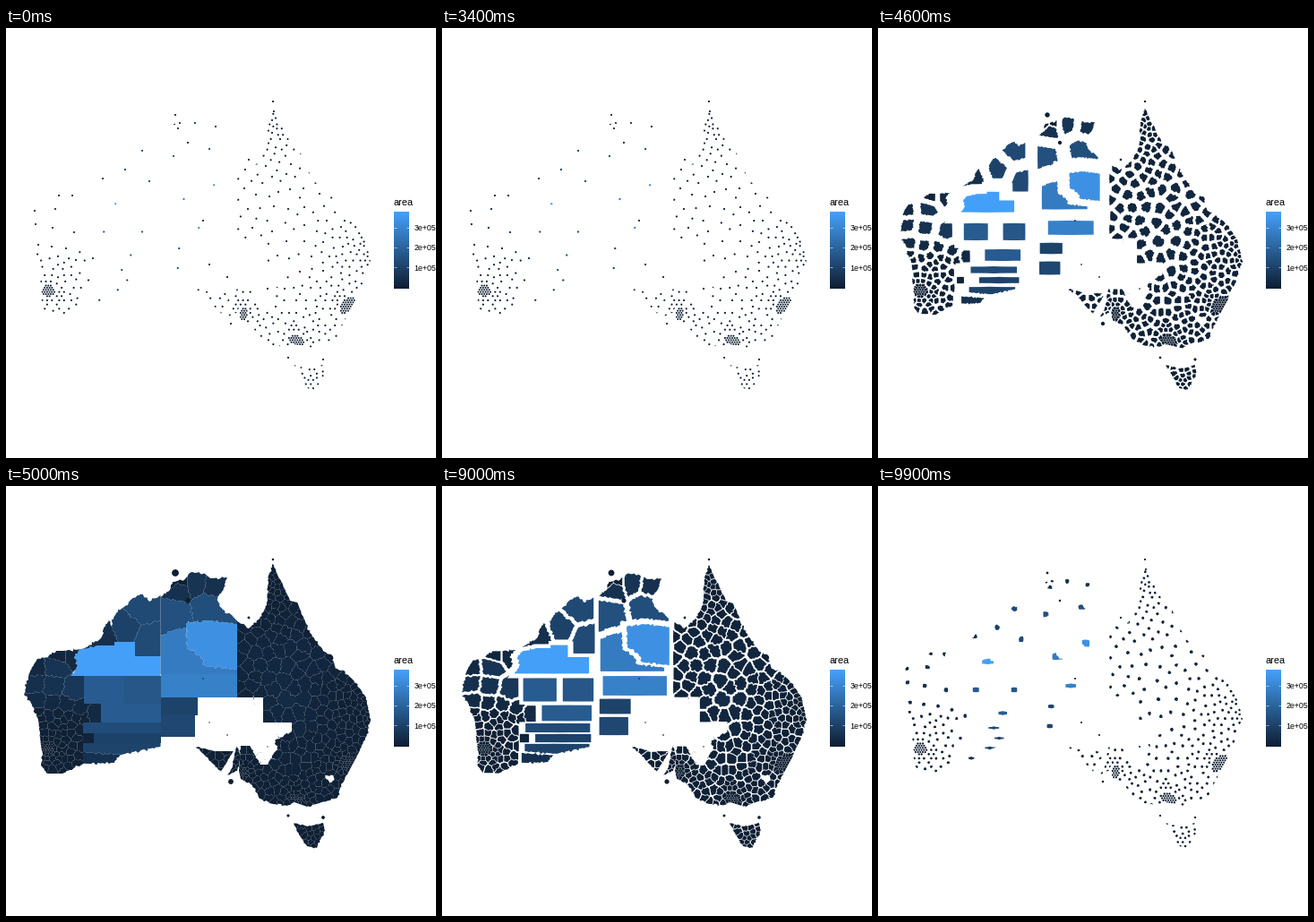
Recreate the animation shown at these times as a matplotlib script. Size 480 by 480 pixels, loop 10000 ms.

```python
import numpy as np
import matplotlib.pyplot as plt
from matplotlib.animation import FuncAnimation
from matplotlib.collections import PolyCollection
from matplotlib.colors import LinearSegmentedColormap
from matplotlib.path import Path

SIZE, FRAMES, INTERVAL = 480, 100, 100
HOLD, MOVE = 33, 17
DOT = 1.1
PITCH = 2.7
ROW = PITCH * np.sqrt(3) / 2
MAX_AREA = 2950
rng = np.random.default_rng(12)
cmap = LinearSegmentedColormap.from_list("area", ["#0e1e32", "#45a1fa"])

# Outback regions: straight boxes (left, top, right, bottom) and outlines.
WB, EB = 172.5, 258  # straight state borders
BOXES = [
    (87, 212, 131.5, 243), (131.5, 212, WB, 243), (106, 243, WB, 264),
    (86, 264, WB, 276), (98, 276, WB, 287), (86, 276, 98, 287),
    (WB, 210, EB, 236), (WB, 236, 214, 256), (WB, 256, 211, 280)]
PILBARA = [(72, 212), (80, 200), (76, 191), (84, 182), (102, 178), (121, 178),
           (121, 174), (144, 174), (144, 190), (WB, 190), (WB, 212)]
TABLELAND = [(201, 153), (224, 150), (EB, 154), (EB, 205), (222, 201), (217, 190), (202, 181)]
CENTRE = [(WB, 167), (187, 161), (201, 158), (202, 181), (217, 190), (222, 201),
          (EB, 205), (EB, 210), (WB, 210)]
PLAIN = [(86, 287), (WB, 287), (WB, 291), (128, 300), (86, 297)]
SOUTH_COAST = [(86, 297), (128, 300), (121, 309), (86, 310)]

# Coastal zones, split into cells around their seeds.
WEST = [
    (84, 182), (64, 184), (56, 184), (47, 191), (35, 193), (26, 209), (20, 233),
    (27, 240), (36, 261), (39, 290), (41, 299), (39, 311), (46, 321), (63, 321),
    (86, 310), (86, 264), (106, 264), (106, 243), (87, 243), (87, 212), (72, 212),
    (80, 200), (76, 191)]
KIMBERLEY = [
    (86, 182), (106, 170), (109, 159), (115, 150), (118, 157), (121, 145), (130, 136),
    (147, 122), (153, 121), (160, 129), (WB, 122), (WB, 190), (144, 190), (144, 174),
    (121, 174), (121, 178), (102, 178)]
TOP_END = [
    (WB, 124), (183, 116), (186, 107), (200, 104), (207, 96), (222, 98), (228, 103),
    (247, 102), (242, 117), (236, 124), (239, 135), (EB, 150), (EB, 154), (224, 150),
    (201, 153), (201, 158), (187, 161), (WB, 167)]
EAST = [
    (EB, 151), (271, 159), (283, 148), (291, 133), (293, 100), (298, 87), (303, 99),
    (309, 110), (317, 128), (325, 130), (334, 151), (342, 168), (354, 184), (364, 189),
    (368, 204), (377, 206), (388, 217), (402, 236), (407, 262), (401, 283), (391, 303),
    (383, 318), (372, 340), (370, 348), (336, 358), (322, 353), (314, 357), (298, 355),
    (283, 349), (275, 334), (262, 327), (260, 318), (262, 290), (272, 290), (284, 311),
    (292, 311), (303, 294), (300, 284), (319, 274), (319, 264), (287, 264), (287, 236),
    (EB, 236)]
EYRE = [(212, 291), (233, 296), (254, 296), (245, 311), (240, 319), (226, 305)]
YORKE = [(258, 290), (262, 303), (258, 318), (247, 323), (253, 313), (255, 300)]
TASMANIA = [(321, 376), (337, 380), (354, 376), (356, 384), (347, 404), (336, 402), (325, 386)]
ZONES = [np.array(z, float)
         for z in (WEST, KIMBERLEY, TOP_END, EAST, EYRE, YORKE, TASMANIA)]

WEST_SEEDS = [
    (32, 204), (33, 219), (59, 187), (74, 187), (55, 202), (52, 223), (36, 242),
    (51, 244), (76, 228), (67, 246), (97, 257), (78, 259)]
NORTH_SEEDS = [
    (108, 168), (133, 158), (152, 137), (160, 171), (187, 143), (227, 135), (211, 106),
    (234, 110), (192, 112), (194, 106), (188, 107)]
EAST_SEEDS = [
    (267, 158), (290, 154), (297, 166), (313, 163), (318, 152), (266, 179), (279, 186),
    (294, 188), (304, 183), (317, 180), (332, 179), (270, 202), (299, 199), (315, 202),
    (333, 200), (275, 223), (297, 227), (313, 238), (333, 220), (333, 238), (354, 239),
    (303, 254), (341, 255), (361, 255), (328, 272), (306, 124), (350, 185), (358, 215),
    (376, 244), (354, 271), (311, 291)]
CAPITAL = (363, 326)  # left blank

# Small islands and enclaves: centre and radius.
ISLES = [(189, 97, 4), (203, 128, 3), (271, 147, 1.5), (298, 82, 1.3), (299, 93, 1),
         (315, 368, 1.6), (354, 370, 2), (251, 330, 3), (220, 215, 0.8), (227, 264, 0.7),
         (247, 278, 0.8), (292, 291, 0.7)]

# City clusters: centre, half axes, tilt in degrees.
CITIES = [(47, 293.5, 7.2, 6.5, 0), (381, 309, 11, 6, -52), (324.5, 348.5, 9, 5, 20),
          (265, 320, 7.5, 4, -75)]
HUBS = np.array([c[:2] for c in CITIES] + [(402, 245), (346, 396), (296, 106)], float)


def snap(x, y):
    """Nearest point of the shared hexagonal grid."""
    row = np.round(y / ROW)
    shift = PITCH / 2 * (row % 2)
    return np.array([np.round((x - shift) / PITCH) * PITCH + shift, row * ROW])


def city_seeds(cx, cy, a, b, tilt):
    c, s = np.cos(np.radians(tilt)), np.sin(np.radians(tilt))
    found = set()
    for y in np.arange(cy - 14, cy + 14, ROW):
        for x in np.arange(cx - 14, cx + 14, PITCH):
            p = snap(x, y)
            dx, dy = p - (cx, cy)
            if ((dx * c + dy * s) / a) ** 2 + ((dy * c - dx * s) / b) ** 2 <= 1:
                found.add(tuple(p))
    return sorted(found)


def scatter(seeds):
    """Fill the settled zones, closer together near the hubs."""
    paths = [Path(z) for z in ZONES]
    for x, y in rng.uniform((20, 85), (410, 405), (20000, 2)):
        p = snap(x, y)
        settled = p[0] > EB or p[1] > 250
        if not settled or not any(path.contains_point(p) for path in paths):
            continue
        gap = min(11, 3.5 + 0.1 * np.hypot(*(HUBS - p).T).min())
        if np.hypot(*(np.array(seeds) - p).T).min() > gap:
            seeds.append(tuple(p))
    return np.array(seeds)


def clip(poly, normal, offset):
    d = poly @ normal - offset
    inside = d <= 0
    if inside.all():
        return poly
    nxt, d_nxt = np.roll(poly, -1, 0), np.roll(d, -1)
    cross = inside != np.roll(inside, -1)
    t = d / np.where(cross, d - d_nxt, 1)
    hits = poly + t[:, None] * (nxt - poly)
    return np.stack([poly, hits], 1)[np.stack([inside, cross], 1)]


def cells(zone, seeds):
    """Voronoi cells of the seeds, cut to the zone."""
    seeds = seeds[Path(zone).contains_points(seeds)]
    for seed in seeds:
        poly = zone
        order = np.argsort(np.hypot(*(seeds - seed).T))[1:45]
        for other in seeds[order]:
            normal = other - seed
            poly = clip(poly, normal, normal @ (seed + other) / 2)
        if len(poly) > 2 and np.hypot(*(seed - CAPITAL)) > 0.1:
            yield poly, seed


def wobble(p):
    x, y = p.T
    return 0.7 * np.stack([np.sin(1.1 * x + 0.7 * y) + np.sin(0.53 * x - 1.3 * y),
                           np.sin(0.9 * y - 1.2 * x) + np.sin(0.47 * y + 0.8 * x + 2)], 1)


def roughen(poly):
    """Subdivide the edges and make slanted ones ragged."""
    parts = []
    for a, b in zip(poly, np.roll(poly, -1, 0)):
        length = np.hypot(*(b - a))
        n = max(1, int(length / 1.5))
        s = np.arange(n)[:, None] / n
        pts = a + s * (b - a)
        if np.abs(b - a).min() > 1e-6:
            pts = pts + min(1.3, 0.12 * length) * np.sin(np.pi * s) * wobble(pts)
        parts.append(pts)
    return np.concatenate(parts)


def measure(poly):
    """Area and centroid."""
    x, y = poly.T
    xn, yn = np.roll(poly, -1, 0).T
    cross = x * yn - xn * y
    area = cross.sum() / 2
    centre = np.array([((x + xn) * cross).sum(), ((y + yn) * cross).sum()]) / (6 * area)
    return abs(area), centre


def build():
    seeds = WEST_SEEDS + NORTH_SEEDS + EAST_SEEDS + [CAPITAL]
    for city in CITIES:
        seeds = seeds + city_seeds(*city)
    seeds = scatter(seeds)
    outlines = [[(l, t), (r, t), (r, b), (l, b)] for l, t, r, b in BOXES]
    outlines += [PILBARA, TABLELAND, CENTRE, PLAIN, SOUTH_COAST]
    regions = []
    for outline in outlines:
        poly = np.array(outline, float)
        regions.append((poly, measure(poly)[1]))
    for zone in ZONES:
        regions += cells(zone, seeds)
    angle = np.linspace(0, 2 * np.pi, 10, endpoint=False) + 0.2
    for x, y, r in ISLES:
        ring = np.stack([x + r * np.cos(angle), y + r * np.sin(angle)], 1)
        regions.append((ring, np.array([x, y])))
    shapes, dots, areas = [], [], []
    for poly, centre in regions:
        shape = roughen(poly)
        ray = shape - centre
        shapes.append(shape)
        dots.append(centre + DOT * ray / (np.hypot(*ray.T)[:, None] + 1e-9))
        areas.append(measure(poly)[0])
    return shapes, dots, np.array(areas)


def openness(frame):
    """0 for dots, 1 for the full map."""
    half, step = divmod(frame, HOLD + MOVE)
    moved = max(0, (step - HOLD) / MOVE) ** 2
    return 1 - moved if half else moved


fig = plt.figure(figsize=(SIZE / 100, SIZE / 100), dpi=100, facecolor="white")
ax = fig.add_axes([0, 0, 1, 1])
shapes, dots, areas = build()
regions = PolyCollection(dots, facecolors=cmap(np.clip(areas / MAX_AREA, 0, 1)),
                         edgecolors="none", linewidths=0)
ax.add_collection(regions)

# Legend
ax.imshow(np.linspace(1, 0, 256)[:, None], cmap=cmap, extent=(433, 450, 291, 205),
          aspect="auto", interpolation="bilinear")
ax.text(432.5, 198, "area", family="Liberation Sans", size=11 * 0.72, va="baseline")
for label, y in (("3e+05", 223), ("2e+05", 245.2), ("1e+05", 267.4)):
    ax.text(455.5, y + 3.2, label, family="Liberation Sans", size=8.8 * 0.72, va="baseline")
    for x in (433, 446.6):
        ax.plot([x, x + 3.4], [y, y], color="white", lw=0.4, solid_capstyle="butt")

ax.set_xlim(0, SIZE)
ax.set_ylim(SIZE, 0)
ax.axis("off")


def draw(frame):
    k = openness(frame)
    regions.set_verts([k * s + (1 - k) * d for s, d in zip(shapes, dots)])
    return [regions]


anim = FuncAnimation(fig, draw, frames=FRAMES, interval=INTERVAL, repeat=True,
                     repeat_delay=0, blit=False)
plt.show()
```
